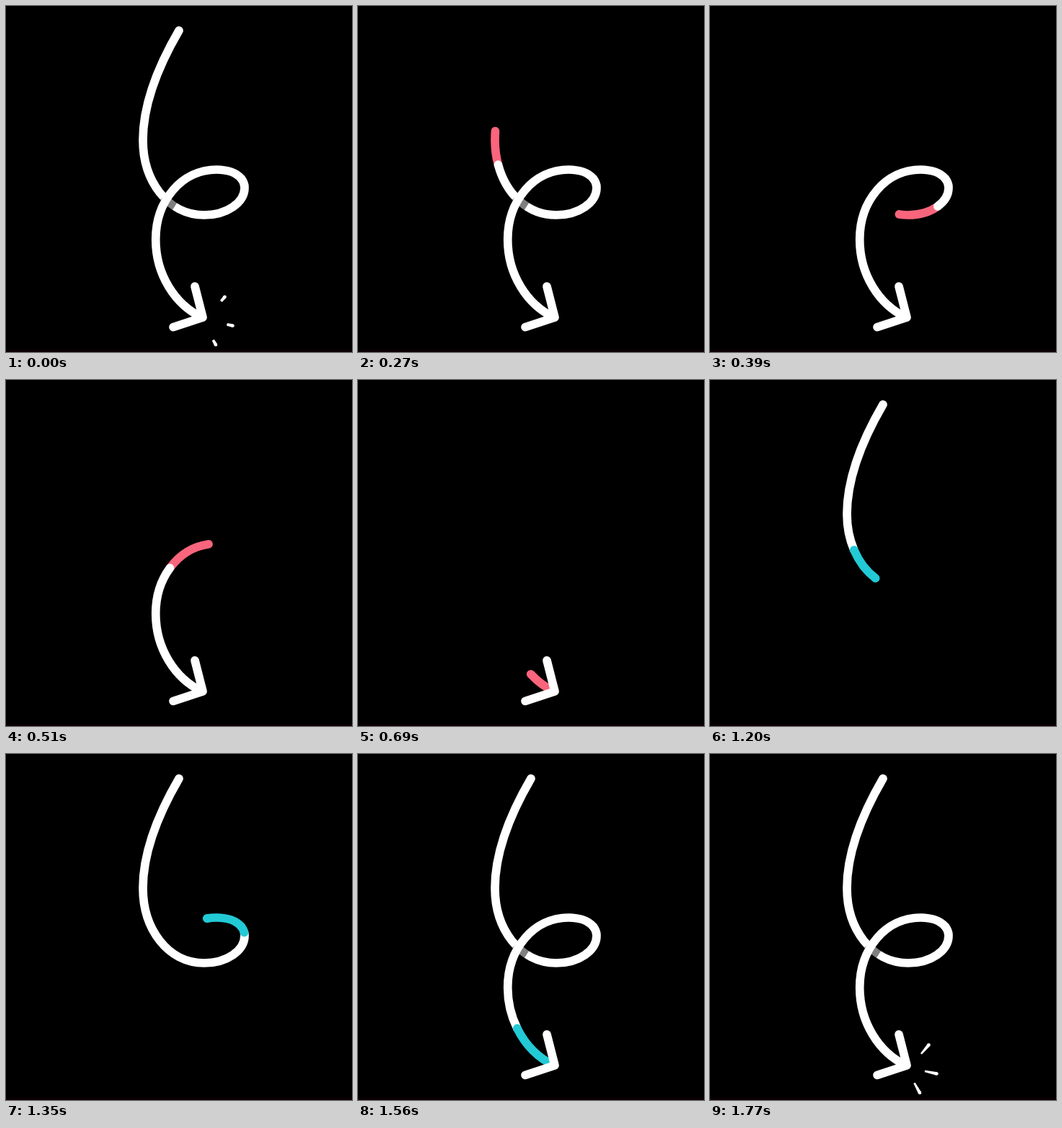
An HTML page with a canvas for the animation above (1.8 s loop, 480 by 480 pixels).

```html
<!DOCTYPE html>
<html lang="en">
<head>
<meta charset="utf-8">
<title>Looping arrow</title>
<style>
html, body { margin: 0; width: 100%; height: 100%; overflow: hidden; background: #000; }
canvas { display: block; width: 100vw; height: 100vh; }
</style>
</head>
<body>
<canvas id="stage" width="480" height="480"></canvas>
<script>
const LOOP = 1800, STEP = 30, WIDTH = 11.7;
const WHITE = '#fff', RED = '#f9657c', TEAL = '#22cad6';
const ctx = document.getElementById('stage').getContext('2d');

const curve = 'M240 34C212 82 190 136 190 186C190 242 224 290 275 290' +
  'C306 290 331 273 331 252C331 237 314 227 292 227' +
  'C244 227 207.7 270 207.7 324C207.7 372 234 414 272 432';
const line = new Path2D(curve);
const head = new Path2D('M262 389L273 432L232 445.5');
const probe = document.createElementNS('http://www.w3.org/2000/svg', 'path');
probe.setAttribute('d', curve);
const LEN = probe.getTotalLength();

// Positions along the line, as fractions of its length
const SPLIT = 0.56, CROSS = 0.73, SHADE = [0.347, 0.376];

// Base and outer end of each spark
const sparks = [
  [288.3, 421.6, 303.5, 403.5],
  [290.6, 438.4, 314.5, 443.5],
  [280.1, 450.4, 291, 470]
];

const clamp = x => Math.min(1, Math.max(0, x));
const ramp = (t, from, to) => clamp((t - from) / (to - from));

function stroke(a, b, color, width = WIDTH, cap = 'round') {
  if (b <= a) return;
  ctx.lineCap = cap;
  ctx.lineWidth = width;
  ctx.strokeStyle = color;
  ctx.setLineDash([(b - a) * LEN, 9999]);
  ctx.lineDashOffset = -a * LEN;
  ctx.stroke(line);
  ctx.setLineDash([]);
}

// Coloured pieces of the line, bottom one first
function pieces(t) {
  if (t < 720) {
    const tail = ramp(t, 150, 723), white = ramp(t, 121, 662);
    return [[tail, white, RED], [white, 1, WHITE]];
  }
  const tip = ramp(t, 990, 1560), white = ramp(t, 1020, 1623);
  return [[0, white, WHITE], [white, tip, TEAL]];
}

function drawLine(t) {
  const parts = pieces(t).filter(([a, b]) => b > a);
  if (!parts.length) return;
  const start = Math.min(...parts.map(p => p[0]));
  const end = Math.max(...parts.map(p => p[1]));
  const layer = (lo, hi) => parts.forEach(([a, b, c]) =>
    stroke(Math.max(a, lo), Math.min(b, hi), c));
  layer(0, SPLIT);
  if (end > CROSS) stroke(Math.max(start, SHADE[0]), SHADE[1], 'rgba(0,0,0,.5)', WIDTH + 2, 'butt');
  layer(SPLIT, 1);
}

function drawHead() {
  ctx.lineCap = ctx.lineJoin = 'round';
  ctx.lineWidth = WIDTH;
  ctx.strokeStyle = WHITE;
  ctx.stroke(head);
}

function drawSpark([x0, y0, x1, y1], u, v) {
  const dx = x1 - x0, dy = y1 - y0, d = Math.hypot(dx, dy);
  const nx = -dy / d, ny = dx / d;
  const half = k => 0.8 + 1.5 * k;
  const at = (k, side) => [x0 + dx * k + nx * half(k) * side, y0 + dy * k + ny * half(k) * side];
  ctx.fillStyle = WHITE;
  ctx.beginPath();
  ctx.moveTo(...at(u, 1));
  ctx.lineTo(...at(v, 1));
  ctx.lineTo(...at(v, -1));
  ctx.lineTo(...at(u, -1));
  ctx.fill();
  ctx.beginPath();
  ctx.arc(x0 + dx * v, y0 + dy * v, half(v), 0, 7);
  ctx.fill();
}

function drawSparks(t) {
  const s = t < 300 ? t + LOOP : t;
  if (s <= 1620 || s >= 1890) return;
  const outer = 1 - (1 - ramp(s, 1620, 1740)) ** 2;
  const inner = 1 - clamp((1890 - s) / 139) ** 2.5;
  sparks.forEach(p => drawSpark(p, inner, outer));
}

function draw(t) {
  ctx.fillStyle = '#000';
  ctx.fillRect(0, 0, 480, 480);
  ctx.fillStyle = '#0a0005';
  ctx.fillRect(0, 477, 480, 3);
  drawLine(t);
  if (t < 720 || t >= 1560) drawHead();
  drawSparks(t);
}

const begin = performance.now();
function tick() {
  const t = (performance.now() - begin) % LOOP;
  draw(Math.floor(t / STEP) * STEP);
  requestAnimationFrame(tick);
}
tick();
</script>
</body>
</html>
```
